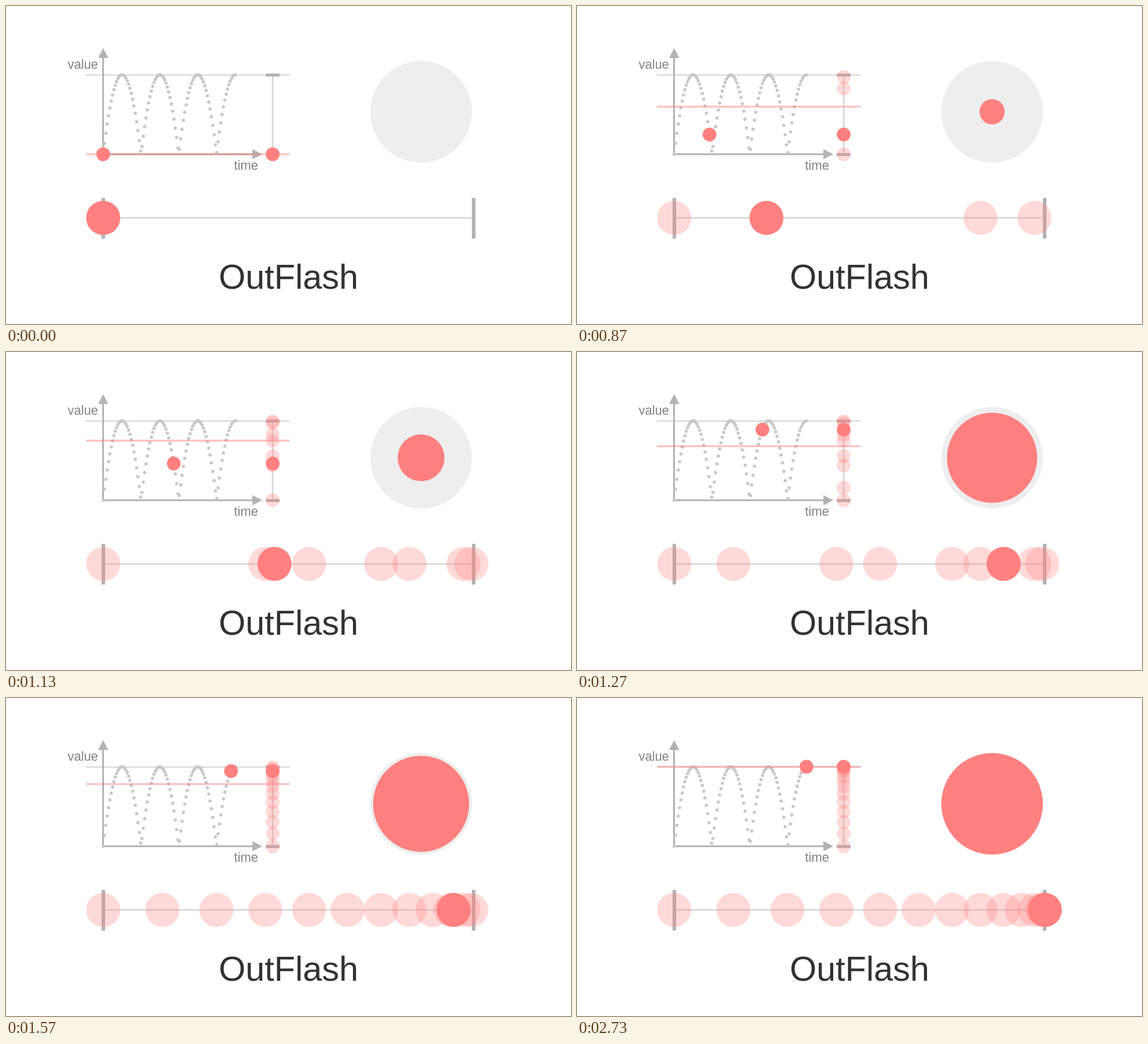
Recreate the animation shown at these times as an HTML page with a canvas. Size 946 by 532 pixels, loop 2.91 s.

```html
<!DOCTYPE html>
<html>
<head>
<meta charset="utf-8">
<title>OutFlash easing</title>
<style>
  html, body { margin: 0; width: 100%; height: 100%; overflow: hidden; background: #fff; }
  canvas { display: block; }
</style>
</head>
<body>
<canvas id="stage" width="946" height="532"></canvas>
<script>
const ctx = document.getElementById('stage').getContext('2d');
const LOOP = 2910, START = 18, STEPS = 30, GHOSTS = 12, SAMPLES = 99;
const RED = '#ff807e', GRAY = '#b3b3b3', LIGHT = '#dcdcdc';
const FONT = 'px "Liberation Sans", Arial, sans-serif';

const clamp01 = x => Math.max(0, Math.min(1, x));

// Seven quadratic ease-outs, alternately forwards and backwards.
function outFlash(p) {
  const phase = p * 7 % 2;
  return 1 - (phase - 1) ** 2;
}

const graphX = p => 162.75 + 221.5 * p;
const graphY = v => 248 - 133 * v;
const slideX = v => 162.75 + 620.5 * v;

function disc(x, y, r, color) {
  ctx.fillStyle = color;
  ctx.beginPath();
  ctx.arc(x, y, r, 0, 2 * Math.PI);
  ctx.fill();
}

function rect(x, y, w, h, color) {
  ctx.fillStyle = color;
  ctx.fillRect(x, y, w, h);
}

function triangle(color, ...points) {
  ctx.fillStyle = color;
  ctx.beginPath();
  points.forEach(([x, y]) => ctx.lineTo(x, y));
  ctx.fill();
}

function label(text, x, y, size, color) {
  ctx.font = size + FONT;
  ctx.fillStyle = color;
  ctx.fillText(text, x, y);
}

function drawGraph() {
  rect(134, 115, 341, 1, GRAY);
  rect(161, 86, 3, 164, GRAY);
  rect(161, 246.5, 252, 3, GRAY);
  triangle(GRAY, [154.2, 87], [171.2, 87], [162.7, 70.5]);
  triangle(GRAY, [412.5, 239.5], [412.5, 256.5], [429, 248]);
  for (let i = 0; i <= SAMPLES; i++) {
    const p = i / SAMPLES;
    disc(graphX(p), graphY(outFlash(p)), 2.75, '#c8c8c8');
  }
  rect(445, 115, 3, 133, LIGHT);
  rect(435, 113, 23, 5, GRAY);
  rect(435, 246, 23, 5, GRAY);
  label('value', 103.3, 105, 21.3, '#828282');
  label('time', 381.8, 273.5, 21.3, '#828282');
}

function drawSlider() {
  rect(163, 353, 620, 3, LIGHT);
  rect(160, 321, 6, 68, GRAY);
  rect(780, 321, 6, 68, GRAY);
}

function drawMarkers(v) {
  disc(446.5, graphY(v), 11.5, RED);
  disc(slideX(v), 354.5, 28.5, RED);
}

function draw(time) {
  // 30 pictures per second on a 10 ms clock
  const tick = Math.floor((Math.floor(time / 10) * 10 + 4) * 0.03);
  const step = tick - START;
  const p = clamp01(step / STEPS);
  const v = outFlash(p);
  const lagging = outFlash(clamp01((step - 1) / STEPS));

  rect(0, 0, 946, 532, '#fff');
  drawGraph();
  drawSlider();
  disc(695, 177, 85, '#eee');
  disc(695, 177, 85 * v, RED);

  // The level line and the ghosts trail by one step.
  ctx.globalAlpha = 0.5;
  rect(134, graphY(lagging) - 1.5, 341, 3, RED);
  ctx.globalAlpha = 0.3;
  for (let i = 0; i <= GHOSTS && i * STEPS <= GHOSTS * (step - 1); i++) {
    drawMarkers(outFlash(i / GHOSTS));
  }
  ctx.globalAlpha = 1;

  disc(graphX(p), graphY(v), 11.5, RED);
  drawMarkers(v);

  ctx.textAlign = 'center';
  label('OutFlash', 473, 473, 57.6, '#323232');
  ctx.textAlign = 'left';
}

const origin = performance.now();
function frame() {
  draw((performance.now() - origin) % LOOP);
  requestAnimationFrame(frame);
}
frame();
</script>
</body>
</html>
```
